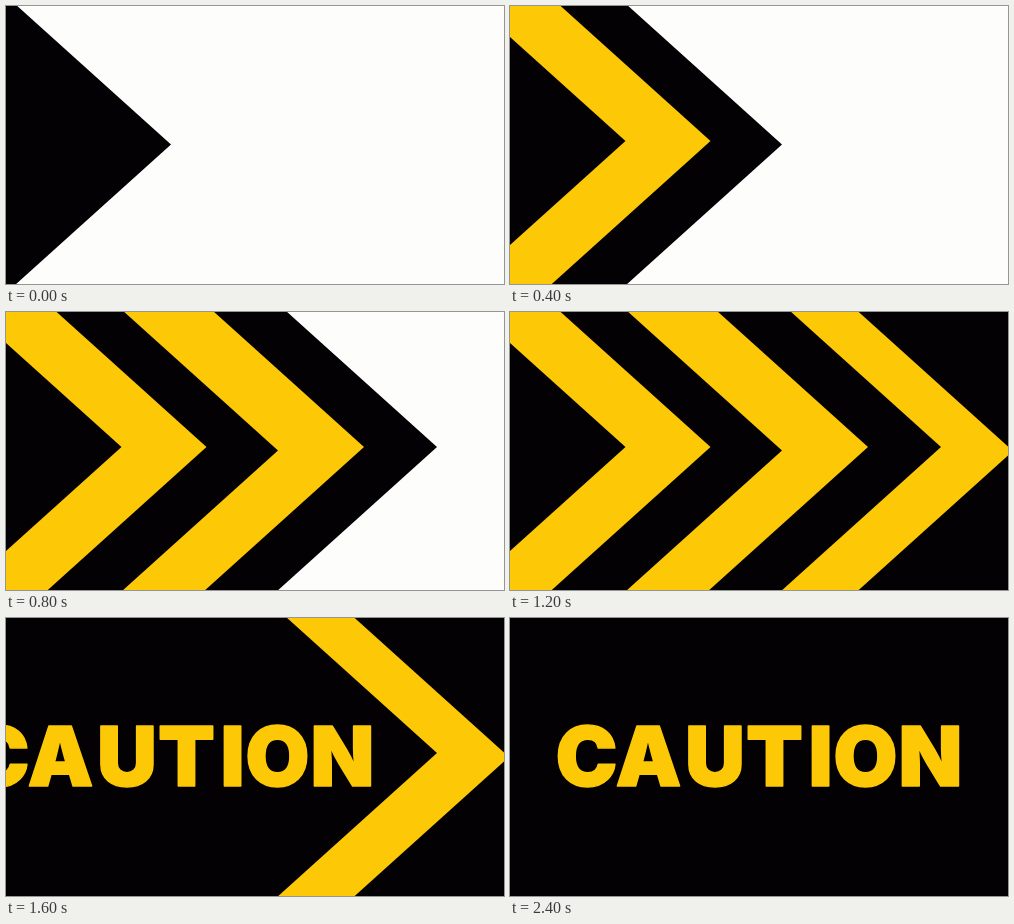
An HTML page with a canvas that plays this animation: 498x278 px, repeating every 2600 ms.

```html
<!DOCTYPE html>
<html lang="en">
<head>
<meta charset="utf-8">
<title>Caution</title>
<style>
  html, body { margin: 0; height: 100%; overflow: hidden; background: #030103; }
  canvas { display: block; }
</style>
</head>
<body>
<canvas id="stage" width="498" height="278"></canvas>
<script>
const ctx = document.getElementById('stage').getContext('2d');
const WHITE = '#fdfefc', BLACK = '#030103', YELLOW = '#fdc907';
const STEP = 200, STEPS = 13, SLOPE = 1.11;

// Arrowheads from the back to the front: tip x, tip y, colour
const arrows = [
  [503, 139, YELLOW], [431, 135, BLACK],
  [358, 135, YELLOW], [272, 138.5, BLACK],
  [200.5, 135, YELLOW], [115.5, 135, BLACK]
];
// Steps whose leading arrow has not settled yet
const leads = { 0: [165, 138.5], 1: [203.5, 135], 3: [346, 135] };
const lastArrow = { 7: 4, 8: 2 };
const textShift = { 7: -243, 8: -84 };
const centers = [76.5, 138.5, 205, 264.5, 310.5, 355.5, 420.5];

function drawArrow(x, y, color) {
  const h = 400;
  ctx.fillStyle = color;
  ctx.beginPath();
  ctx.moveTo(x - h * SLOPE, y - h);
  ctx.lineTo(x, y);
  ctx.lineTo(x - h * SLOPE, y + h);
  ctx.fill();
}

function drawText(shift) {
  ctx.font = '900 83px Inter, "Liberation Sans", sans-serif';
  ctx.textAlign = 'center';
  ctx.lineJoin = 'round';
  ctx.lineWidth = 1.5;
  ctx.fillStyle = ctx.strokeStyle = YELLOW;
  [...'CAUTION'].forEach((letter, i) => {
    ctx.fillText(letter, centers[i] + shift, 168.2);
    ctx.strokeText(letter, centers[i] + shift, 168.2);
  });
}

function draw(now) {
  const step = Math.floor(now / STEP) % STEPS;
  ctx.fillStyle = step < 6 ? WHITE : BLACK;
  ctx.fillRect(0, 0, 498, 278);

  const first = Math.max(0, 5 - step);
  const end = step < 7 ? arrows.length : lastArrow[step] || 0;
  for (let i = first; i < end; i++) {
    const [x, y, color] = arrows[i];
    const [tipX, tipY] = i === first && leads[step] || [x, y];
    drawArrow(tipX, tipY, color);
  }
  if (step >= 7) drawText(textShift[step] || 0);
}

const start = performance.now();
function loop() {
  draw(performance.now() - start);
  requestAnimationFrame(loop);
}
loop();
</script>
</body>
</html>
```
